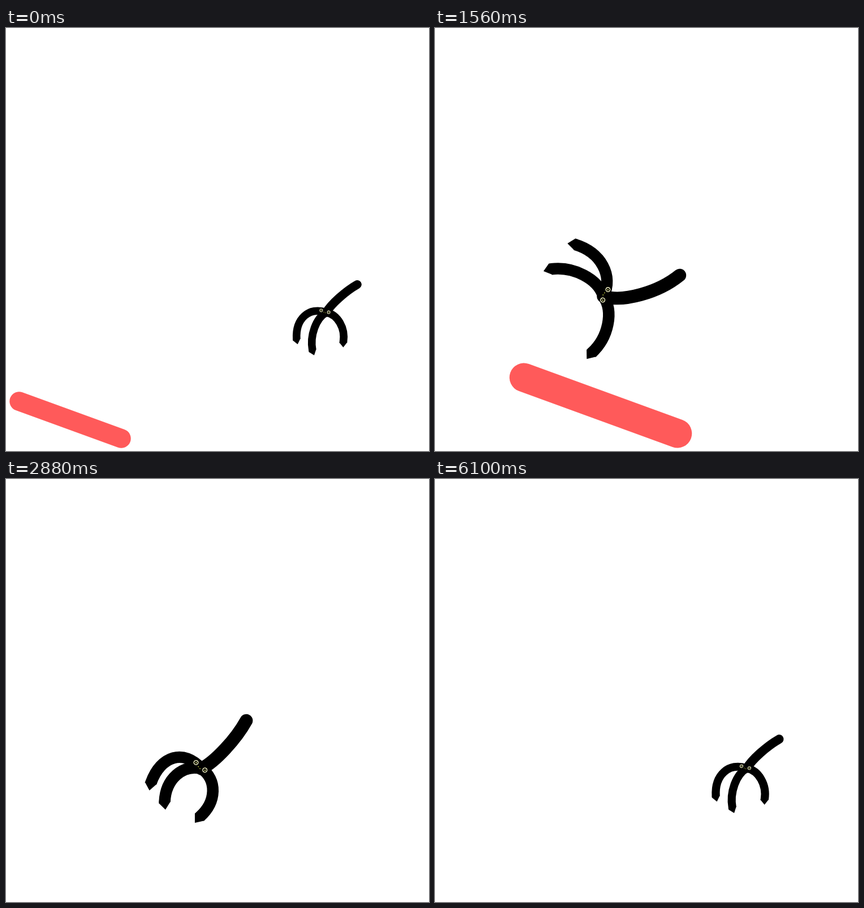
Recreate the animation shown at these times as an HTML page with a canvas. Size 748 by 748 pixels, loop 6.13 s.

```html
<!DOCTYPE html>
<html lang="en">
<head>
<meta charset="utf-8">
<title>Leaping claw</title>
<style>
html, body { margin: 0; width: 100%; height: 100%; overflow: hidden; background: #fff; }
canvas { display: block; width: 748px; height: 748px; }
</style>
</head>
<body>
<canvas id="stage" width="748" height="748"></canvas>
<script>
const ctx = document.getElementById('stage').getContext('2d');
const LOOP = 6130, STEP = 30;
const PEAK = 1400, TOUCH = 1560, SETTLED = 1860, HOP = 2520, REST = 3240, EXIT = 5770;
const RAD = Math.PI / 180;

// Each limb: direction (degrees from the face), length, bend;
// with the changes to add in full flip and in full crouch.
const LEFT = { rest: [124, 106, .4], flip: [1, -2, -.08], crouch: [0, -18, .07] };
const MIDDLE = { rest: [96, 107, .19], flip: [-5, -3, .03], crouch: [2, -26, .18] };
const RIGHT = { rest: [46, 91, -.26], flip: [-61, 11, .03], crouch: [7, -8, -.1] };
const TAIL = { rest: [-56, 111, -.07], flip: [-76, 29, .21], crouch: [-42, 7, .2], tail: true };

const ramp = (t, a, b) => Math.min(1, Math.max(0, (t - a) / (b - a)));
const mix = (a, b, u) => a + (b - a) * u;
const smooth = u => u * u * (3 - 2 * u);
const zoomAt = t => mix(.665, 1, ramp(t, 480, 790));

// Run in, then spin over a ballistic jump onto the log.
function jump(t) {
  const spin = ramp(t, 0, TOUCH) ** 1.63;
  const land = smooth(ramp(t, TOUCH, SETTLED));
  const arc = 395 + .003 * (t - PEAK) ** 2;
  const ground = t < PEAK ? Math.max(478, 501 - .0417 * t) : 617;
  return {
    x: t < 630 ? 564 - .246 * t : 300 + 109 * (1 - ramp(t, 630, 1673)) ** 2,
    y: Math.min(arc, ground),
    size: zoomAt(t),
    turn: mix(14 + 102.6 * spin, 37, land),
    flip: spin * (1 - land),
    crouch: land
  };
}

// Push off from the log and straighten up.
function hop(t) {
  const u = ramp(t, HOP, REST);
  return {
    x: 300 + 108 * u ** 1.3,
    y: 617 - 154 * Math.sin(u * Math.PI / 2),
    size: 1,
    turn: 37 + 7 * u - 30 * ramp(t, 3150, REST),
    flip: 0,
    crouch: 1 - u * u
  };
}

function retreat(t) {
  const u = ramp(t, EXIT, LOOP);
  return {
    x: mix(372, 565, u), y: mix(582, 503, u), size: mix(1, .666, u),
    turn: 14, flip: 0, crouch: 0
  };
}

function disc(x, y, r, color) {
  ctx.fillStyle = color;
  ctx.beginPath();
  ctx.arc(x, y, r, 0, 7);
  ctx.fill();
}

function drawLimb(part, pose) {
  const flip = part.tail ? pose.flip ** 2 : pose.flip;
  const [dir, len, bend] = part.rest.map((v, i) =>
    v + flip * part.flip[i] + pose.crouch * part.crouch[i]);
  const side = bend * len, c1 = .22 * len, c2 = .68 * len;
  ctx.save();
  ctx.translate(4, 2);
  ctx.rotate(dir * RAD);
  ctx.strokeStyle = ctx.fillStyle = '#000';
  ctx.lineWidth = part.tail ? 23 : 20.5;
  ctx.lineCap = part.tail ? 'round' : 'butt';
  ctx.beginPath();
  ctx.moveTo(0, 0);
  ctx.bezierCurveTo(c1, side, c2, side, len, 0);
  ctx.stroke();
  if (!part.tail) {
    ctx.translate(len, 0);
    ctx.rotate(Math.atan2(-side, len - c2));
    drawFoot();
  }
  ctx.restore();
}

function drawFoot() {
  ctx.beginPath();
  ctx.moveTo(-1, -10.25);
  ctx.lineTo(14, -2);
  ctx.lineTo(3, 10.25);
  ctx.lineTo(-1, 10.25);
  ctx.fill();
}

function drawFace() {
  disc(0, 2, 11, '#000');
  for (const x of [-10.3, 10.3]) {
    disc(x, 0, 4.5, '#f3f3c4');
    disc(x, 0, 3, '#000');
    disc(x + .3, 0, 1.2, '#d5d873');
  }
  disc(-2.4, 2.8, .9, '#c9cf3c');
  disc(2, 3.6, .9, '#c9cf3c');
}

function withBody(pose, paint) {
  ctx.save();
  ctx.translate(pose.x, pose.y);
  ctx.rotate(pose.turn * RAD);
  ctx.scale(pose.size, pose.size);
  paint();
  ctx.restore();
}

// The view pans and zooms over the log and the green pad.
function drawScene(t) {
  const zoom = zoomAt(t);
  const pad = ramp(t, 300, 420) * (1 - ramp(t, 650, 780));
  const log = 1 - ramp(t, 2490, 2717) ** 2;
  ctx.save();
  ctx.translate(mix(113.5, 293, ramp(t, 0, 820)), mix(693, 667.5, ramp(t, 480, 790)));
  ctx.scale(zoom, zoom);
  if (pad > 0) {
    ctx.fillStyle = '#adef34';
    ctx.beginPath();
    ctx.ellipse(329, -191.5, 39 * pad, 11.5 * pad, 0, 0, 7);
    ctx.fill();
  }
  if (log > 0) {
    ctx.rotate(20 * RAD);
    ctx.scale(log, log);
    ctx.strokeStyle = '#ff5a5a';
    ctx.lineCap = 'round';
    ctx.lineWidth = 51;
    ctx.beginPath();
    ctx.moveTo(-144.5, 0);
    ctx.lineTo(144.5, 0);
    ctx.stroke();
  }
  ctx.restore();
}

function draw(t) {
  const pose = t < HOP ? jump(t) : t < EXIT ? hop(t) : retreat(t);
  ctx.fillStyle = '#fff';
  ctx.fillRect(0, 0, 748, 748);
  // the right leg reaches behind the log
  withBody(pose, () => drawLimb(RIGHT, pose));
  if (t < EXIT) drawScene(t);
  withBody(pose, () => {
    for (const part of [LEFT, MIDDLE, TAIL]) drawLimb(part, pose);
    drawFace();
  });
}

const start = performance.now();
function run(now) {
  const t = Math.max(0, now - start) % LOOP;
  const base = t < EXIT ? 0 : EXIT;
  draw(base + Math.floor((t - base) / STEP) * STEP);
  requestAnimationFrame(run);
}
run(start);
</script>
</body>
</html>
```
